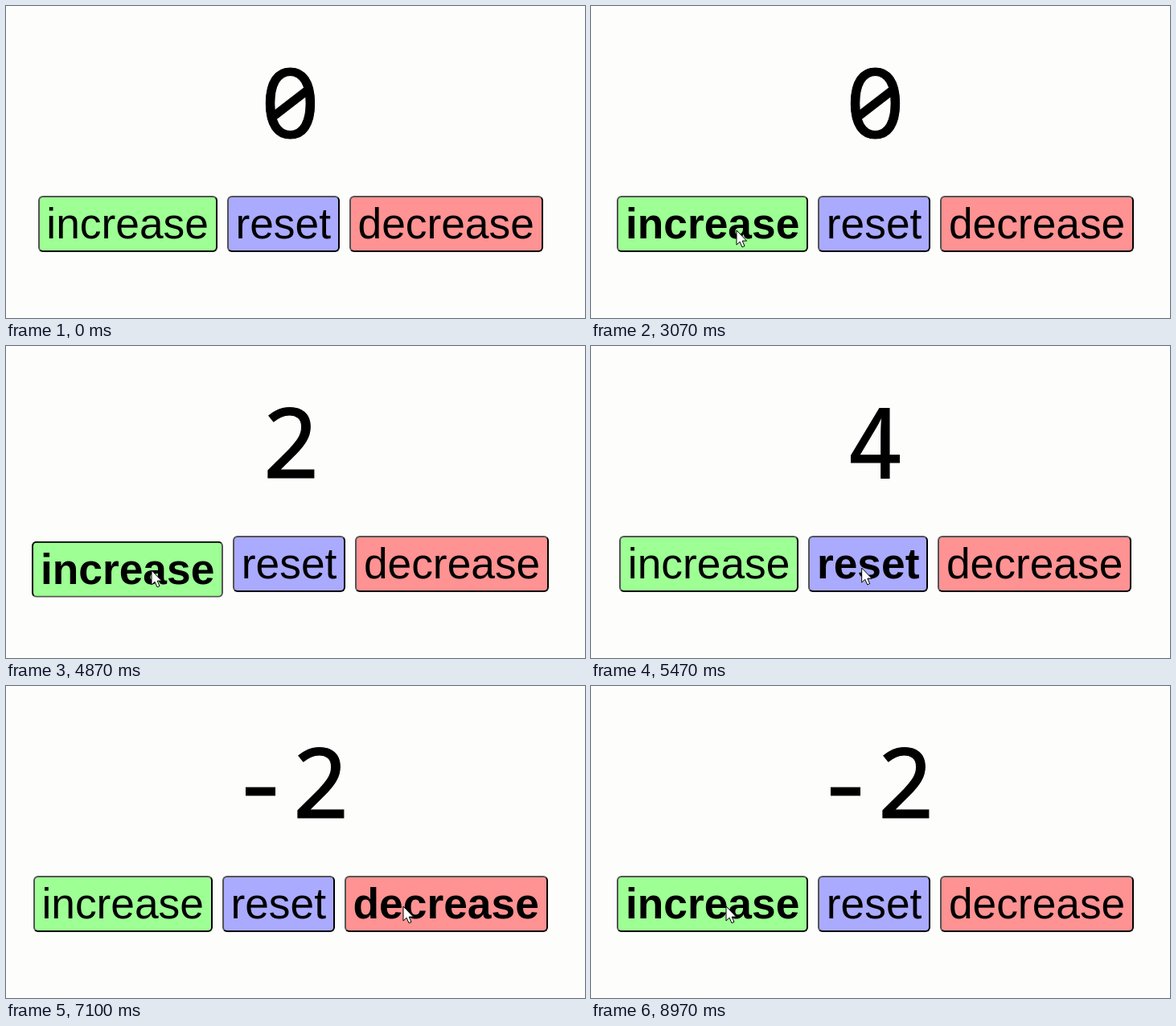
Write an HTML page that moves like this. It is 720x388 px and loops after 9.01 s.

```html
<!DOCTYPE html>
<html lang="en">
<head>
<meta charset="utf-8">
<title>Counter</title>
<style>
  html, body {
    margin: 0;
    width: 100%;
    height: 100%;
    overflow: hidden;
    background: #fdfdfc;
  }
  svg {
    position: absolute;
    left: 0;
    top: 0;
    pointer-events: none;
  }
  #value {
    font: 120px "Noto Sans Mono", monospace;
    letter-spacing: 2px;
    text-anchor: middle;
    stroke: #000;
    stroke-width: 1px;
  }
  /* Round zero with a shallow slash */
  #slash { display: none; }
  .zero #value { font: 118px Inter, sans-serif; }
  .zero #slash { display: inline; }
  #buttons {
    position: absolute;
    left: 0;
    top: 236px;
    width: 707.2px;
    display: flex;
    justify-content: center;
    gap: 12px;
  }
  button {
    flex: none;
    margin: 0;
    padding: 0 8.75px;
    border: 2px outset #000;
    border-radius: 6px;
    color: #000;
    font: 53.33px/66px "Liberation Sans", Arial, sans-serif;
    pointer-events: none;
  }
  button.hover { font-weight: bold; }
  button.down { border-style: inset; }
  #increase { background: #9dff94; }
  #reset { background: #aaaaff; }
  #decrease { background: #ff9292; }
</style>
</head>
<body>
<div id="buttons">
  <button id="increase">increase</button>
  <button id="reset">reset</button>
  <button id="decrease">decrease</button>
</div>
<svg id="stage" width="720" height="388">
  <text id="value" x="354.5" y="164">0</text>
  <path id="slash" d="M331 138.5L377 103" stroke="#000" stroke-width="11"/>
  <path id="cursor" d="M0 0V18L4.1 14.2L7 20.8L10 19.5L7.2 13.1H12.6Z"
        fill="#fff" stroke="#000" stroke-linejoin="round"/>
</svg>
<script>
  const LOOP = 9010, HOLD = 90, RETURN = 130, DEPTH = 12;
  const INC = 0, RESET = 1, DEC = 2;

  const buttons = [...document.querySelectorAll('button')];
  const stage = document.getElementById('stage');
  const value = document.getElementById('value');
  const cursor = document.getElementById('cursor');

  // Evenly spaced presses: button, first press time, interval, count
  const clicks = [
    [INC, 4340, 240, 4],
    [RESET, 6195, 0, 1],
    [DEC, 6665, 220, 6],
    [INC, 8150, 190, 4]
  ].flatMap(([button, start, step, count]) =>
    Array.from({ length: count }, (_, i) => ({ button, at: start + i * step })));

  // Pointer stops: time, x, y
  const path = [
    [1050, -14, 296], [1750, 176, 291], [2350, 176, 291], [2750, 181, 279],
    [5250, 181, 279], [5580, 390, 275], [6310, 390, 275], [6520, 494, 274],
    [7880, 494, 274], [8110, 168, 274], [LOOP, 168, 274]
  ];

  const smooth = s => s * s * (3 - 2 * s);

  function pointerAt(t) {
    const i = path.findIndex(p => p[0] > t);
    if (i < 1) return null;
    const [t0, x0, y0] = path[i - 1], [t1, x1, y1] = path[i];
    const s = smooth((t - t0) / (t1 - t0));
    return { x: x0 + (x1 - x0) * s, y: y0 + (y1 - y0) * s };
  }

  function hoverAt(p) {
    if (!p || p.x < 36) return -1;
    return p.x < 265 ? INC : p.x < 422 ? RESET : DEC;
  }

  function pressOffset(age) {
    if (age < 0 || age > HOLD + RETURN) return 0;
    return age < HOLD ? DEPTH * age / HOLD
                      : DEPTH * (1 - smooth((age - HOLD) / RETURN));
  }

  function countAt(t) {
    return clicks.filter(c => t >= c.at + HOLD).reduce((n, c) =>
      c.button === RESET ? 0 : n + (c.button === INC ? 1 : -1), 0);
  }

  function draw() {
    const t = performance.now() % LOOP;
    const pointer = pointerAt(t);
    const hover = hoverAt(pointer);
    const count = countAt(t);

    buttons.forEach((el, i) => {
      const ages = clicks.filter(c => c.button === i).map(c => t - c.at);
      const y = Math.max(...ages.map(pressOffset));
      el.classList.toggle('hover', i === hover);
      el.classList.toggle('down', ages.some(a => a >= 0 && a < HOLD));
      el.style.transform = y ? `translateY(${y}px)` : 'none';
    });

    value.textContent = count;
    stage.classList.toggle('zero', count === 0);
    cursor.style.display = pointer ? '' : 'none';
    if (pointer) cursor.setAttribute('transform', `translate(${pointer.x} ${pointer.y})`);
    requestAnimationFrame(draw);
  }
  draw();
</script>
</body>
</html>
```
